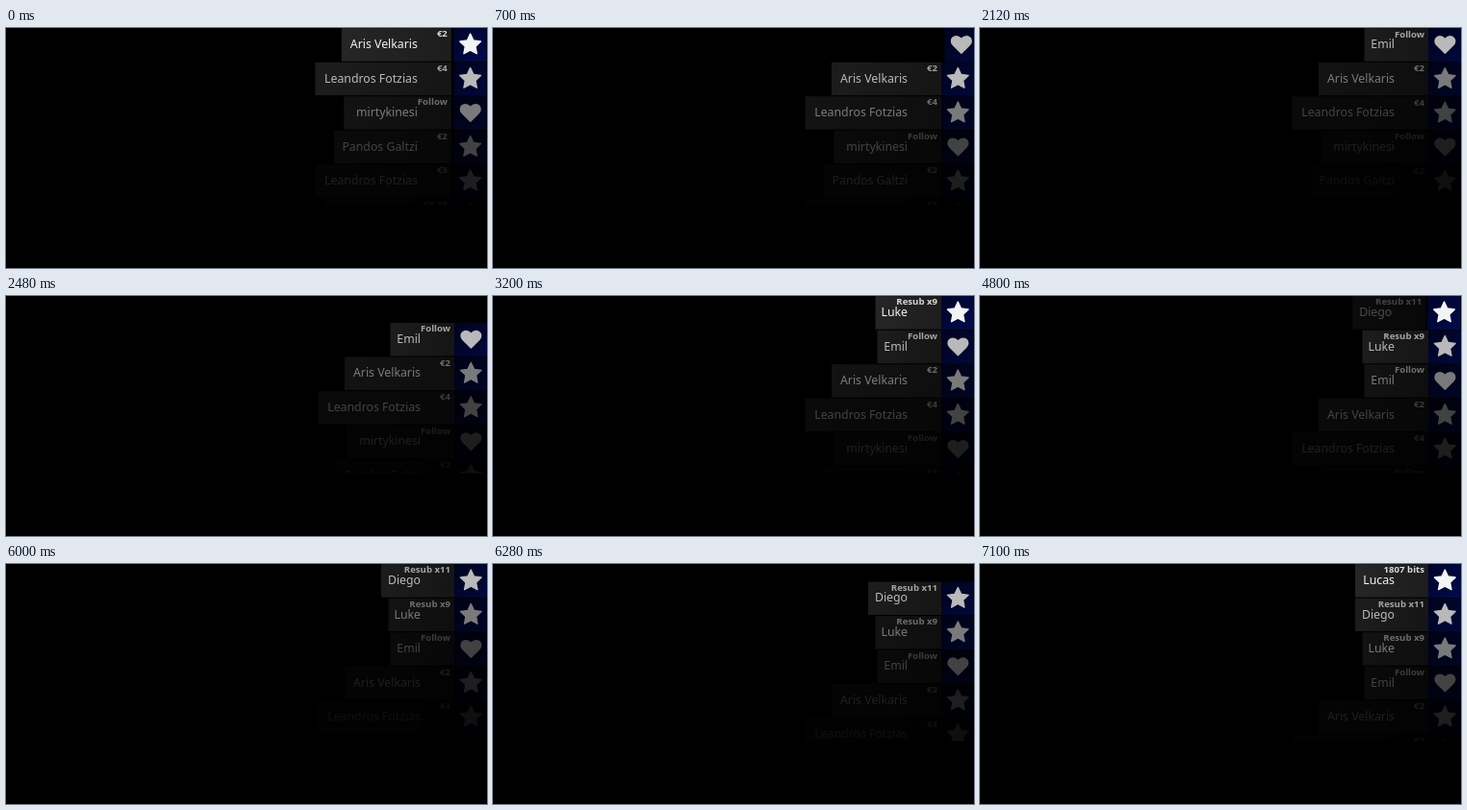
Animation of 500x250 px, one loop 8000 ms. Source, as an HTML page:

```html
<!DOCTYPE html>
<html lang="en">
<head>
<meta charset="utf-8">
<title>Event list</title>
<style>
html, body { margin: 0; width: 100%; height: 100%; overflow: hidden; background: #000; }
svg { display: block; width: 100%; height: 100%; }
text { font-family: "Noto Sans", "Open Sans", sans-serif; text-anchor: end; fill: #f4f4f4; }
.name { font-size: 12.3px; font-weight: 500; }
.kind { font-size: 9.6px; font-weight: 700; fill: #d8d8d8; }
</style>
</head>
<body>
<svg id="stage" viewBox="0 0 500 250">
  <defs>
    <linearGradient id="navy" x1="0" y1="0" x2="1" y2="1">
      <stop offset="0" stop-color="#000428"/>
      <stop offset="1" stop-color="#000c4c"/>
    </linearGradient>
    <linearGradient id="slate" x1="0" y1="0" x2="1" y2="0">
      <stop offset="0" stop-color="#262626"/>
      <stop offset="1" stop-color="#1d1d1d"/>
    </linearGradient>
    <clipPath id="view"><rect width="500" height="184.5"/></clipPath>
  </defs>
  <rect width="500" height="250" fill="#000"/>
  <g id="list" clip-path="url(#view)"></g>
</svg>
<script>
const LOOP = 8000, PITCH = 35.5;
const FADE = [1, 0.76, 0.5, 0.27, 0.12, 0.06];
const PUSHES = [140, 2100, 4100, 6000];

// Newest first: name, kind, left edge of the label, icon
const ITEMS = [
  ["Lucas", "1807 bits", 390, "star"],
  ["Diego", "Resub x11", 390, "star"],
  ["Luke", "Resub x9", 397.5, "star"],
  ["Emil", "Follow", 399.5, "heart"],
  ["Aris Velkaris", "€2", 352, "star"],
  ["Leandros Fotzias", "€4", 324.5, "star"],
  ["mirtykinesi", "Follow", 354.5, "heart"],
  ["Pandos Galtzi", "€2", 344, "star"],
  ["Leandros Fotzias", "€3", 324.5, "star"],
  ["Marios Dentakis", "€5.35", 332, "star"]
];

function starPath(cx, cy, outer, inner) {
  const pts = Array.from({ length: 10 }, (_, i) => {
    const a = (i / 5 - 0.5) * Math.PI, r = i % 2 ? inner : outer;
    return (cx + r * Math.cos(a)).toFixed(2) + " " + (cy + r * Math.sin(a)).toFixed(2);
  });
  return "M" + pts.join("L") + "Z";
}

const ICONS = {
  star: starPath(483.3, 17.5, 11.4, 5.6),
  heart: "M483.4 26.2L474.6 17.4C472.2 14.8 472.6 11 475.3 9.4C478.1 7.9 481 8.8 483.4 11.4" +
         "C485.8 8.8 488.7 7.9 491.5 9.4C494.2 11 494.6 14.8 492.2 17.4Z"
};

function make(tag, attrs, parent, text) {
  const el = document.createElementNS("http://www.w3.org/2000/svg", tag);
  for (const k in attrs) el.setAttribute(k, attrs[k]);
  if (text) el.textContent = text;
  parent.appendChild(el);
  return el;
}

const list = document.getElementById("list");
const rows = ITEMS.map(([name, kind, left, icon]) => {
  const row = make("g", {}, list);
  const label = make("g", {}, row);
  make("rect", { x: left, y: 0.2, width: 466 - left, height: 34.4, fill: "url(#slate)" }, label);
  make("text", { x: 431, y: 21, class: "name" }, label, name);
  make("text", { x: 462, y: 9.4, class: "kind" }, label, kind);
  const badge = make("g", {}, row);
  make("rect", { x: 466, y: 0, width: 34, height: 35, fill: "url(#navy)" }, badge);
  make("path", { d: ICONS[icon], fill: "#f4f4f4", stroke: "#f4f4f4", "stroke-width": 1.4,
                 "stroke-linejoin": "round" }, badge);
  return { row, label, badge };
});

const clamp = v => Math.max(0, Math.min(1, v));
const span = (t, start, length) => clamp((t - start) / length);
const easeInOut = p => (1 - Math.cos(Math.PI * p)) / 2;
const easeOutBack = p => 1 - 1.8 * (1 - p) ** 3 + 0.8 * (1 - p) ** 2;
const nudge = p => -6.8 * Math.sin(Math.PI * p);

function place(el, x, y, opacity) {
  el.setAttribute("transform", `translate(${x.toFixed(2)} ${y.toFixed(2)})`);
  el.setAttribute("opacity", opacity.toFixed(3));
}

function draw(t) {
  const count = PUSHES.filter(s => t >= s).length;
  const first = PUSHES.length - count;
  const age = count ? t - PUSHES[count - 1] : Infinity;
  const push = easeInOut(span(age, 0, 550));

  rows.forEach(({ row, label, badge }, i) => {
    const slot = i - first;
    const shown = slot >= 0 && slot < FADE.length;
    row.setAttribute("display", shown ? "inline" : "none");
    if (!shown) return;

    place(row, 0, slot ? PITCH * (slot - 1 + push) : 0, FADE[slot]);

    const fresh = slot === 0 && count > 0;
    const settle = i >= PUSHES.length ? nudge(clamp(0.15 + t / 500)) : 0;
    const slide = fresh ? span(age, 393, 420) : 1;
    place(badge, 34 * (1 - easeOutBack(slide)) + settle * 0.2, 0, clamp(slide * 1.9));

    const reveal = fresh ? span(age, 640, 460) : 1;
    place(label, nudge(reveal) + settle, 0, clamp(reveal * 2.3));
  });
}

function tick() {
  draw(performance.now() % LOOP);
  requestAnimationFrame(tick);
}
tick();
</script>
</body>
</html>
```
